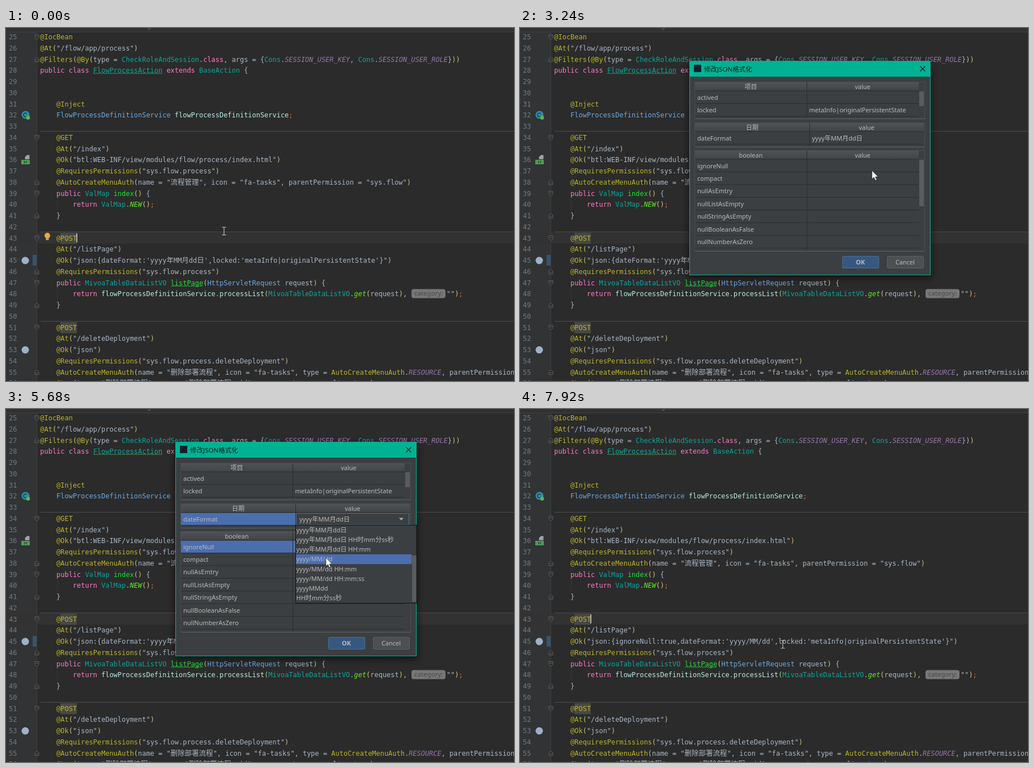
These frames come from a looping animation (897x624 px, 8 s). An HTML page:

```html
<!DOCTYPE html>
<html lang="zh-CN">
<head>
<meta charset="utf-8">
<title>Editor dialog</title>
<style>
html, body { margin: 0; width: 100%; height: 100%; overflow: hidden; background: #2b2b2b; }
svg { display: block; width: 897px; height: 624px; }
text { white-space: pre; }
.code text { font: 11.96px "DejaVu Sans Mono", "Noto Sans CJK SC", monospace; fill: #a9b7c6; }
.code .num { fill: #74797d; }
.cjk { font-size: 12.5px; }
.note { fill: #bbb529; }
.key { fill: #ff7ac8; }
.type { fill: #0ba69b; }
.link { fill: #6ea8e0; }
.const { fill: #9876aa; font-style: italic; }
.fn { fill: #1fe03a; }
.call { fill: #5cf01c; font-style: italic; }
.field { fill: #b9ede4; }
.paren { fill: #d6c27e; }
.end { fill: #cc7832; }
.ui text { font: 11px "Noto Sans", "Noto Sans CJK SC", sans-serif; fill: #bbbbbb; }
</style>
</head>
<body>
<svg viewBox="0 0 897 624" xmlns="http://www.w3.org/2000/svg">
  <defs>
    <linearGradient id="head" x2="0" y2="1"><stop stop-color="#505355"/><stop offset="1" stop-color="#414446"/></linearGradient>
    <filter id="shade" x="-10%" y="-10%" width="120%" height="125%"><feGaussianBlur stdDeviation="6"/></filter>
  </defs>
  <g class="code" id="editor"></g>
  <g class="ui" id="dialog"></g>
  <g id="pointer"></g>
</svg>
<script>
const LOOP = 8000, PITCH = 19.75, CHAR = 7.2;
const $ = id => document.getElementById(id);
const rect = (x, y, w, h, fill, more = '') => `<rect x="${x}" y="${y}" width="${w}" height="${h}" fill="${fill}" ${more}/>`;
const path = (d, stroke, more = '') => `<path d="${d}" stroke="${stroke}" fill="none" ${more}/>`;
const text = (x, y, s, more = '') => `<text x="${x}" y="${y}" ${more}>${s}</text>`;
const rowY = n => 16 + (n - 25) * PITCH;

// --- editor ---
const FIRST = 25;
const lines = `@IocBean
@At("/flow/app/process")
@Filters(@By(type = CheckRoleAndSession.class, args = {Cons.SESSION_USER_KEY, Cons.SESSION_USER_ROLE}))
public class FlowProcessAction extends BaseAction {


    @Inject
    FlowProcessDefinitionService flowProcessDefinitionService;

    @GET
    @At("/index")
    @Ok("btl:WEB-INF/view/modules/flow/process/index.html")
    @RequiresPermissions("sys.flow.process")
    @AutoCreateMenuAuth(name = "流程管理", icon = "fa-tasks", parentPermission = "sys.flow")
    public ValMap index() {
        return ValMap.NEW();
    }

    @POST
    @At("/listPage")

    @RequiresPermissions("sys.flow.process")
    public MivoaTableDataListVO listPage(HttpServletRequest request) {
        return flowProcessDefinitionService.processList(MivoaTableDataListVO.get(request),
    }

    @POST
    @At("/deleteDeployment")
    @Ok("json")
    @RequiresPermissions("sys.flow.process.deleteDeployment")
    @AutoCreateMenuAuth(name = "删除部署流程", icon = "fa-tasks", type = AutoCreateMenuAuth.RESOURCE, parentPermission = "sys.flow.process")
    @Log(tag = "删除部署流程", msg = "删除部署流程: id", param = true, result = true)`.split('\n');

const rules = [
  ['str', /"[^"]*"/],
  ['note', /@\w+|\bAutoCreateMenuAuth\b/],
  ['key', /\b(?:public|class|extends|return)\b/],
  ['type', /\b(?:CheckRoleAndSession|Cons|FlowProcessAction|BaseAction|ValMap|MivoaTableDataListVO)\b/],
  ['link', /\b(?:FlowProcessDefinitionService|HttpServletRequest)\b/],
  ['const', /\b(?:SESSION_\w+|RESOURCE)\b/],
  ['fn', /\b(?:index|listPage)\b/],
  ['call', /\b(?:NEW|get)\b/],
  ['field', /\b(?:flowProcessDefinitionService|processList)\b/],
  ['paren', /[()]/],
  ['end', /;/]
];
const lexer = new RegExp(rules.map(([name, r]) => `(?<${name}>${r.source})`).join('|'), 'g');
const paint = s => s.replace(lexer, (m, ...rest) => {
  const groups = rest[rest.length - 1];
  return `<tspan class="${Object.keys(groups).find(k => groups[k])}">${m}</tspan>`;
}).replace(/[\u4e00-\u9fff]+/g, m => `<tspan class="cjk">${m}</tspan>`);
const codeLine = (n, s) => {
  const body = s.trimStart();
  return text(60.3 + (s.length - body.length) * CHAR, rowY(n) + 4, paint(body));
};
const wave = (x, y, w, color) => {
  let d = `M${x} ${y}`;
  for (let i = 2; i <= w; i += 2) d += `L${x + i} ${y + (i % 4 ? -1.5 : 0)}`;
  return path(d, color, 'stroke-width="1"');
};
const fold = (n, up) => {
  const k = up ? -1 : 1;
  return `<g transform="translate(54.5 ${rowY(n)}) scale(1 ${k})"><path d="M-3.5 -4H3.5V1L0 4L-3.5 1Z" fill="#2b2b2b" stroke="#606366"/><path d="M-2 -1H2" stroke="#606366"/></g>`;
};
const badge = n => `<circle cx="34" cy="${rowY(n)}" r="6.5" fill="#9db1c9"/>`;

function drawEditor() {
  let s = rect(0, 0, 897, 624, '#2b2b2b') + rect(0, 0, 54, 624, '#313335');
  s += rect(0, 361.5, 897, 19.5, '#323232');
  s += rect(0, 0, 897, 7, '#2f3133') + rect(0, 6.5, 897, 1, '#434547');
  s += text(62, 0, 'FlowProcessAction › listPage', 'opacity=".5"');
  s += path('M54.5 8V624', '#3c3e40');
  s += [182.5, 360.5, 518.5].map(y => path(`M61 ${y}H897`, '#4d4d4d')).join('');
  s += [40, 48].map(n => path(`M90.5 ${rowY(n) - 10}v20`, '#373737')).join('');
  s += [43, 51].map(n => rect(96, rowY(n) - 9.5, 29, 19.5, '#484844')).join('');
  s += rect(47, 401, 7, 19, '#375469');
  lines.forEach((line, i) => {
    const n = FIRST + i;
    s += text(5, rowY(n) + 4, n, 'class="num"') + codeLine(n, line);
  });
  s += wave(154, 81, 122, '#3f9a55') + wave(291, 457, 57, '#1fb83a');
  s += rect(716, 461.5, 60, 16, '#777777', 'rx="4"');
  s += text(721, 473, 'category:', 'style="font:11.5px \'Noto Sans\',sans-serif;fill:#474747"');
  s += text(778, rowY(48) + 4, paint('"");'));
  s += [25, 34, 39, 43, 47, 51].map(n => fold(n)).join('');
  s += [27, 38, 41, 46, 49, 55].map(n => fold(n, true)).join('');
  s += '<circle cx="34.5" cy="153.5" r="7" fill="#318ba5"/>' + path('M37 151.5A3.4 3.4 0 1 0 37 155.8', '#24404a', 'stroke-width="1.6"');
  s += '<circle cx="39" cy="158.5" r="3.4" fill="#58b947"/>';
  s += path('M34 231.5V228L37 225H41V231.5Z', '#9aa4aa', 'style="fill:#9aa4aa"');
  s += rect(27, 233, 15, 8, '#4f9d55') + path('M32.5 234.5v5M36.5 234.5v5M32.5 237h4', '#274a2b');
  s += badge(45) + badge(53);
  s += '<g id="before"></g><g id="after"></g>';
  s += '<g id="bulb"><circle cx="73" cy="367" r="5" fill="#f0a732"/>' + rect(70.5, 371, 5, 4, '#b8a27a') + '</g>';
  s += rect(124.4, 363, 1.4, 16, '#e0e0e0', 'id="caret"');
  $('editor').innerHTML = s;
  $('before').innerHTML = codeLine(45, `    @Ok("json:{dateFormat:'yyyy年MM月dd日',locked:'metaInfo|originalPersistentState'}")`);
  $('after').innerHTML = codeLine(45, `    @Ok("json:{ignoreNull:true,dateFormat:'yyyy/MM/dd',locked:'metaInfo|originalPersistentState'}")`);
}

// --- dialog ---
const BLUE = '#4b6eaf', BODY = '#3c3f41', GRID = '#2a2c2e';
const ROW = 22.45;
const centered = (x, y, s, more = '') => text(x, y, s, `text-anchor="middle" ${more}`);

function table(top, bottom, split, right, title, rows) {
  let s = rect(309, top, right - 309, 15, 'url(#head)') + path(`M${split + .5} ${top}v15`, GRID);
  s += centered((309 + split) / 2, top + 12, title) + centered((split + right) / 2, top + 12, 'value');
  const y0 = top + 15.5;
  rows.forEach(([name, value = ''], i) => {
    const y = y0 + i * ROW;
    s += path(`M309 ${y + ROW - .5}H${right}`, GRID);
    s += text(313, y + 15, name) + text(split + 4.5, y + 15, value);
  });
  s += path(`M${split + .5} ${y0}V${bottom - 1}M309 ${y0 - .5}H${right}`, GRID);
  s += path(`M308.5 ${bottom}V${top - .5}H714.5V${bottom}`, '#4a4d4f') + path(`M309 ${bottom + .5}H715`, '#606365');
  return s;
}
const arrow = (x, y) => `<path d="M${x - 4} ${y - 2}h8l-4 4.5z" fill="#a8acae"/>`;
const combo = (x, y, w, s) => rect(x + .5, y + .5, w, 20.5, BODY, 'stroke="#46749f"') + text(x + 6, y + 14.5, s) + arrow(x + w - 13, y + 10.5);

function popup(id, x, y, w, items, hlWidth, extra = '') {
  const h = items.length * 17.15;
  return `<g id="${id}">` + rect(x + .5, y + .5, w - 1, h + .5, BODY, 'stroke="#111"') +
    rect(x + 1, y + .5, hlWidth, 17.2, BLUE, `id="${id}Mark"`) +
    items.map((item, i) => text(x + 1.5, y + 13 + i * 17.15, item)).join('') + extra + '</g>';
}

function drawDialog() {
  const flags = ['ignoreNull', 'compact', 'nullAsEmtry', 'nullListAsEmpty', 'nullStringAsEmpty', 'nullBooleanAsFalse', 'nullNumberAsZero'];
  const formats = ['yyyy年MM月dd日', 'yyyy年MM月dd日 HH时mm分ss秒', 'yyyy年MM月dd日 HH:mm', 'yyyy/MM/dd', 'yyyy/MM/dd HH:mm', 'yyyy/MM/dd HH:mm:ss', 'yyyyMMdd', 'HH时mm分ss秒'];
  let s = rect(297, 62, 430, 381, '#000', 'opacity=".5" filter="url(#shade)"');
  s += rect(299.5, 58.5, 425, 378, BODY, 'stroke="#00b294"') + rect(299, 58, 426, 28, '#00b294');
  s += rect(307, 65, 13, 13, '#10202c');
  s += text(325, 76.5, '修改JSON格式化', 'style="fill:#0c1c1a;font-size:11.5px"');
  s += path('M706.5 67.5l9 9m0 -9l-9 9', '#0c1c1a', 'stroke-width="1.2"');
  s += `<g id="rowFlag">${rect(309, 232.5, 197, 22, BLUE)}</g><g id="rowDate">${rect(309, 183.5, 202, 22, BLUE)}</g>`;
  s += rect(507, 232.5, 197, 22, BLUE, 'id="flagCell"');
  s += table(96, 160, 506, 704, '项目', [['actived'], ['locked', 'metaInfo|originalPersistentState']]);
  s += table(168, 210, 511, 713, '日期', [['dateFormat', '<tspan id="dateValue"></tspan>']]);
  s += table(217, 394, 506, 704, 'boolean', flags.map((f, i) => [f, i ? '' : '<tspan id="flagValue"></tspan>']));
  s += rect(705, 112, 8, 26, '#5a5d5f') + rect(705, 233, 8, 82, '#5a5d5f');
  s += rect(569.5, 403.5, 64, 21, '#365880', 'stroke="#4c708c" rx="2"') + centered(601, 418.3, 'OK', 'style="font-weight:bold"');
  s += rect(648.5, 403.5, 64, 21, '#4c5052', 'stroke="#5e6162" rx="2"') + centered(680, 418.3, 'Cancel');
  s += `<g id="dateFocus">${rect(511.5, 183.5, 201, 21.5, BLUE, 'stroke="#9fbce6"')}${text(515.5, 198.5, 'yyyy/MM/dd')}</g>`;
  s += `<g id="flagCombo">${combo(507, 233, 196, '')}</g><g id="dateCombo">${combo(512, 184, 199, formats[0])}</g>`;
  s += popup('flagList', 507, 254.5, 197, ['', 'true', 'false'], 195);
  s += popup('dateList', 511, 205, 214.5, formats, 204.5, rect(717, 259, 7.5, 82, '#5a5d5f'));
  $('dialog').innerHTML = s;
}

// --- pointer: start, x, y, click ring ---
const moves = [
  [0, 385, 359], [600, 170, 408], [800, 111, 420], [1200, 46, 420], [1400, 34, 420], [1820, 34, 414],
  [2420, 420, 330], [2620, 610, 276], [3040, 616, 262], [3240, 621.5, 252], [3640, 615, 246, 1], [3840, 604, 264],
  [4260, 591, 286.5, 1], [4460, 591, 287], [4860, 597, 192, 1], [5080, 592, 192, 1], [5480, 577, 240], [5680, 565, 263],
  [6080, 565, 272, 1], [6280, 565, 273], [6700, 588, 421], [6900, 591.5, 417], [7300, 595, 416], [7920, 464, 416]
];
$('pointer').innerHTML = '<circle id="ring" r="10.5" fill="#d2c21e" opacity=".82"/>' +
  '<path id="hand" d="M0 0V15L3.5 11.8L6 17.3L8.4 16.2L6 11H10.8Z" fill="#fff" stroke="#222" stroke-width=".7"/>' +
  path('M-3.5 -7H-1L0 -6L1 -7H3.5M0 -6V6M-3.5 7H-1L0 6L1 7H3.5', '#d8d8d8', 'id="beam"');

drawEditor();
drawDialog();

const show = (id, on) => $(id).style.display = on ? '' : 'none';

function render(t) {
  const within = (a, b) => t >= a && t < b;
  const [, x, y, click] = moves.filter(m => m[0] <= t).pop();
  const isHand = within(1200, 7300);
  $('pointer').setAttribute('transform', `translate(${x} ${y})`);
  show('ring', click);
  show('hand', isHand);
  show('beam', !isHand);

  show('caret', t < 200 || within(600, 1200) || t >= 7300);
  show('bulb', t < 1400);
  show('before', t < 7300);
  show('after', t >= 7300);

  const opening = t < 2020;
  show('dialog', within(1820, 7300));
  $('dialog').setAttribute('opacity', opening ? .86 : 1);
  $('dialog').setAttribute('transform', opening ? 'translate(512 247.5) scale(.99) translate(-512 -247.5)' : '');

  show('rowFlag', t >= 3640);
  show('flagCell', t >= 3640);
  show('flagCombo', within(3640, 4460));
  show('flagList', within(3640, 4460));
  $('flagListMark').setAttribute('y', 255 + (t >= 4260 ? 17.15 : 0));
  $('flagValue').textContent = t >= 4460 ? 'true' : '';

  show('rowDate', t >= 4860);
  show('dateCombo', within(4860, 6280));
  show('dateList', within(4860, 6280));
  show('dateFocus', t >= 6280);
  const mark = t < 5480 ? 0 : t < 5680 ? 2 : 3;
  $('dateListMark').setAttribute('y', 205.5 + mark * 17.15);
  $('dateValue').textContent = t < 4860 ? 'yyyy年MM月dd日' : '';
}

const start = performance.now();
(function tick() {
  render((performance.now() - start) % LOOP);
  requestAnimationFrame(tick);
})();
</script>
</body>
</html>
```
